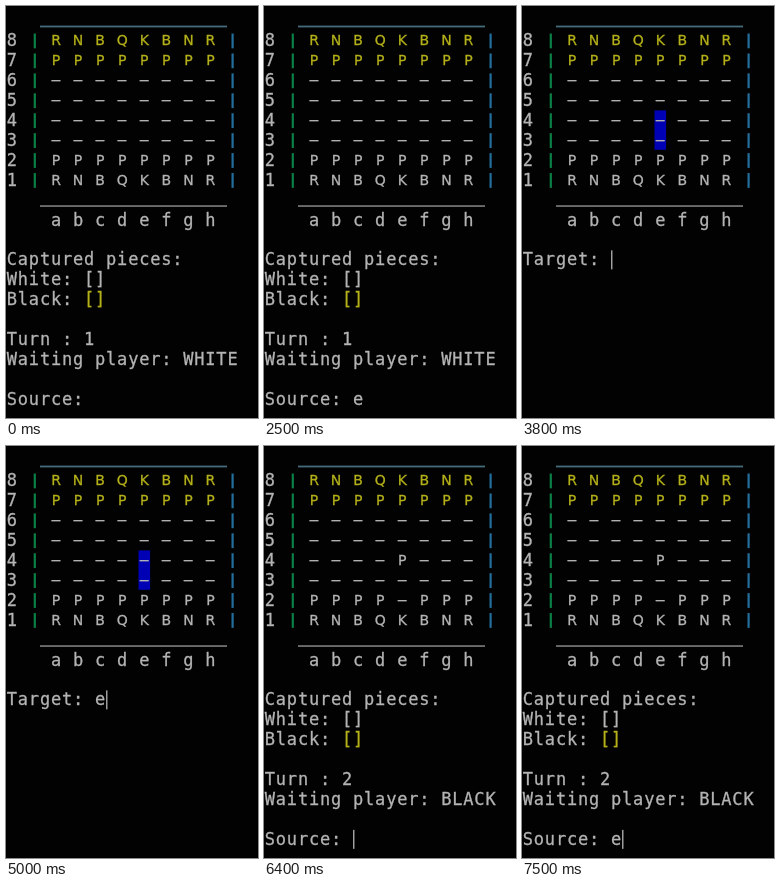
Recreate the animation shown at these times as an HTML page with a canvas. Size 252 px wide and 412 px high, loop 8000 ms.

```html
<!DOCTYPE html>
<html lang="en">
<head>
<meta charset="utf-8">
<title>Console chess</title>
<style>
html, body { margin: 0; width: 100%; height: 100%; overflow: hidden; background: #020202; }
canvas { display: block; }
</style>
</head>
<body>
<canvas id="stage" width="252" height="412"></canvas>
<script>
const ctx = document.getElementById("stage").getContext("2d");
const LOOP = 8000, CELL = 11.03, ROW = 19.93, TOP = 5;
const GREY = "#b4b4b4", YELLOW = "#b4b01a", GREEN = "#0a8046", BLUE = "#236e9c";
const TEXT_FONT = '17px "DejaVu Sans Mono", monospace';
const PIECE_FONT = '14px "DejaVu Sans", sans-serif';

// [start ms, screen, typed text, cursor visible]
const steps = [
  [0, "white", "", 0], [200, "white", "", 1], [700, "white", "", 0],
  [1300, "white", "", 1], [1800, "white", "", 0], [2000, "white", "e", 1],
  [2500, "white", "e", 0], [3000, "white", "e", 1], [3100, "white", "e2", 1],
  [3600, "white", "e2", 0],
  [3800, "target", "", 1], [4300, "target", "", 0], [4900, "target", "", 1],
  [5000, "target", "e", 1], [5600, "target", "e", 0], [5700, "target", "e4", 1],
  [6200, "target", "e4", 0],
  [6400, "black", "", 1], [6900, "black", "", 0], [7400, "black", "", 1],
  [7500, "black", "e", 1],
];

const rect = (x, y, w, h, color) => {
  ctx.fillStyle = color;
  ctx.fillRect(x, y, w, h);
};

// Writes text on the console grid, one character per cell.
function write(text, row, col = 0, color = GREY, font = TEXT_FONT) {
  ctx.font = font;
  ctx.textAlign = "center";
  ctx.fillStyle = ctx.strokeStyle = color;
  ctx.lineWidth = 0.3;
  const baseline = TOP + row * ROW + (font === PIECE_FONT ? 14.5 : 15.3);
  [...text].forEach((ch, i) => {
    const x = (col + i + 0.5) * CELL + 0.4;
    ctx.fillText(ch, x, baseline);
    ctx.strokeText(ch, x, baseline);
  });
}

function drawBoard(moved, highlight) {
  const back = "RNBQKBNR", pawns = "PPPPPPPP", empty = "−−−−−−−−";
  const ranks = [back, pawns, empty, empty, moved ? "−−−−P−−−" : empty, empty,
                 moved ? "PPPP−PPP" : pawns, back];
  rect(34, 19.6, 187, 1.8, "#456c7a");
  if (highlight) rect(132.5, 104.4, 11.6, 39.4, "#0000b4");
  ranks.forEach((rank, i) => {
    const row = i + 1, y = TOP + row * ROW;
    write(String(8 - i), row);
    rect(27.7, y + 2.6, 2.2, 14.8, GREEN);
    rect(225.5, y + 2.6, 2.2, 14.8, BLUE);
    write([...rank].join(" "), row, 4, i < 2 ? YELLOW : GREY, PIECE_FONT);
  });
  rect(34, 199.2, 187, 1.7, "#787878");
  write("a b c d e f g h", 10, 4);
}

function drawStatus(turn, player) {
  write("Captured pieces:", 12);
  write("White: []", 13);
  write("Black:", 14);
  write("[]", 14, 7, YELLOW);
  write("Turn : " + turn, 16);
  write("Waiting player: " + player, 17);
}

function drawPrompt(label, row, typed, cursor) {
  write(label + " " + typed, row);
  if (cursor) {
    const col = label.length + 1 + typed.length;
    rect(col * CELL + 0.8, TOP + row * ROW + 0.2, 1.4, 19, "#a8a8a8");
  }
}

function draw(now) {
  const t = now % LOOP;
  const [, screen, typed, cursor] = steps.findLast(step => step[0] <= t);
  rect(0, 0, 252, 412, "#020202");
  drawBoard(screen === "black", screen === "target");
  if (screen === "target") {
    drawPrompt("Target:", 12, typed, cursor);
  } else {
    drawStatus(screen === "white" ? 1 : 2, screen.toUpperCase());
    drawPrompt("Source:", 19, typed, cursor);
  }
}

let start;
function tick(now) {
  start ??= now;
  draw(now - start);
  requestAnimationFrame(tick);
}
draw(0);
requestAnimationFrame(tick);
</script>
</body>
</html>
```
